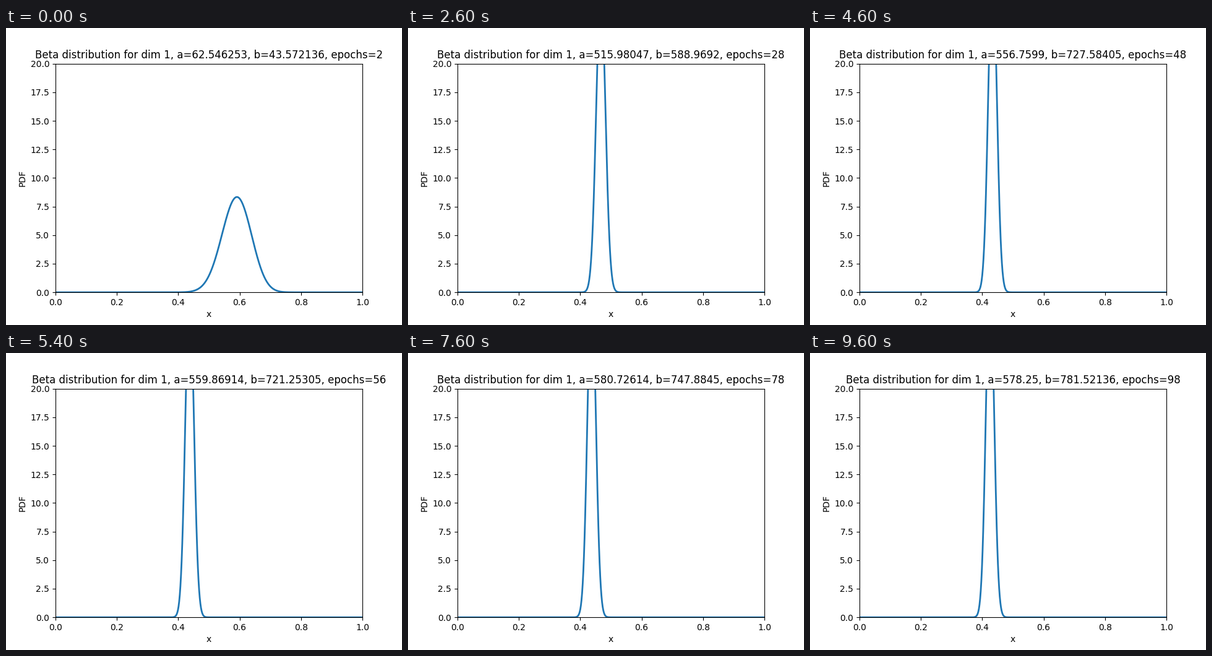
Recreate the animation shown at these times as a matplotlib script. Size 640x480 px, loop 9.8 s.

```python
import math

import matplotlib.pyplot as plt
import numpy as np
from matplotlib.animation import FuncAnimation

FRAMES = 49
INTERVAL = 200

# Known shape parameters (epoch, a, b); the training drifts between them.
KEYS = np.array([
    (2, 62.546253, 43.572136),
    (14, 323.149, 485.63608),
    (28, 515.98047, 588.9692),
    (40, 553.628, 733.9377),
    (56, 559.86914, 721.25305),
    (78, 580.72614, 747.8845),
    (98, 578.25, 781.52136),
])


def params(epoch):
    """Interpolate the mean and concentration, then return a and b."""
    epochs, a, b = KEYS.T
    total = np.interp(epoch, epochs, a + b)
    mean = np.interp(epoch, epochs, a / (a + b))
    return np.float32(total * mean), np.float32(total * (1 - mean))


def beta_pdf(x, a, b):
    a, b = float(a), float(b)
    log_norm = math.lgamma(a + b) - math.lgamma(a) - math.lgamma(b)
    return np.exp(log_norm + (a - 1) * np.log(x) + (b - 1) * np.log1p(-x))


fig, ax = plt.subplots(figsize=(6.4, 4.8), dpi=100)
ax.set(xlim=(0, 1), ylim=(0, 20), xlabel="x", ylabel="PDF")
x = np.linspace(0, 1, 1001)
inner = np.clip(x, 1e-9, 1 - 1e-9)
line, = ax.plot([], [], color="#1f77b4", lw=2)
title = ax.set_title("")


def update(i):
    epoch = 2 * (i + 1)
    a, b = params(epoch)
    line.set_data(x, beta_pdf(inner, a, b))
    title.set_text(f"Beta distribution for dim 1, a={str(a)}, b={str(b)}, epochs={epoch}")
    return line, title


anim = FuncAnimation(fig, update, frames=FRAMES, interval=INTERVAL,
                     repeat=True, repeat_delay=0, blit=False)
plt.show()
```
